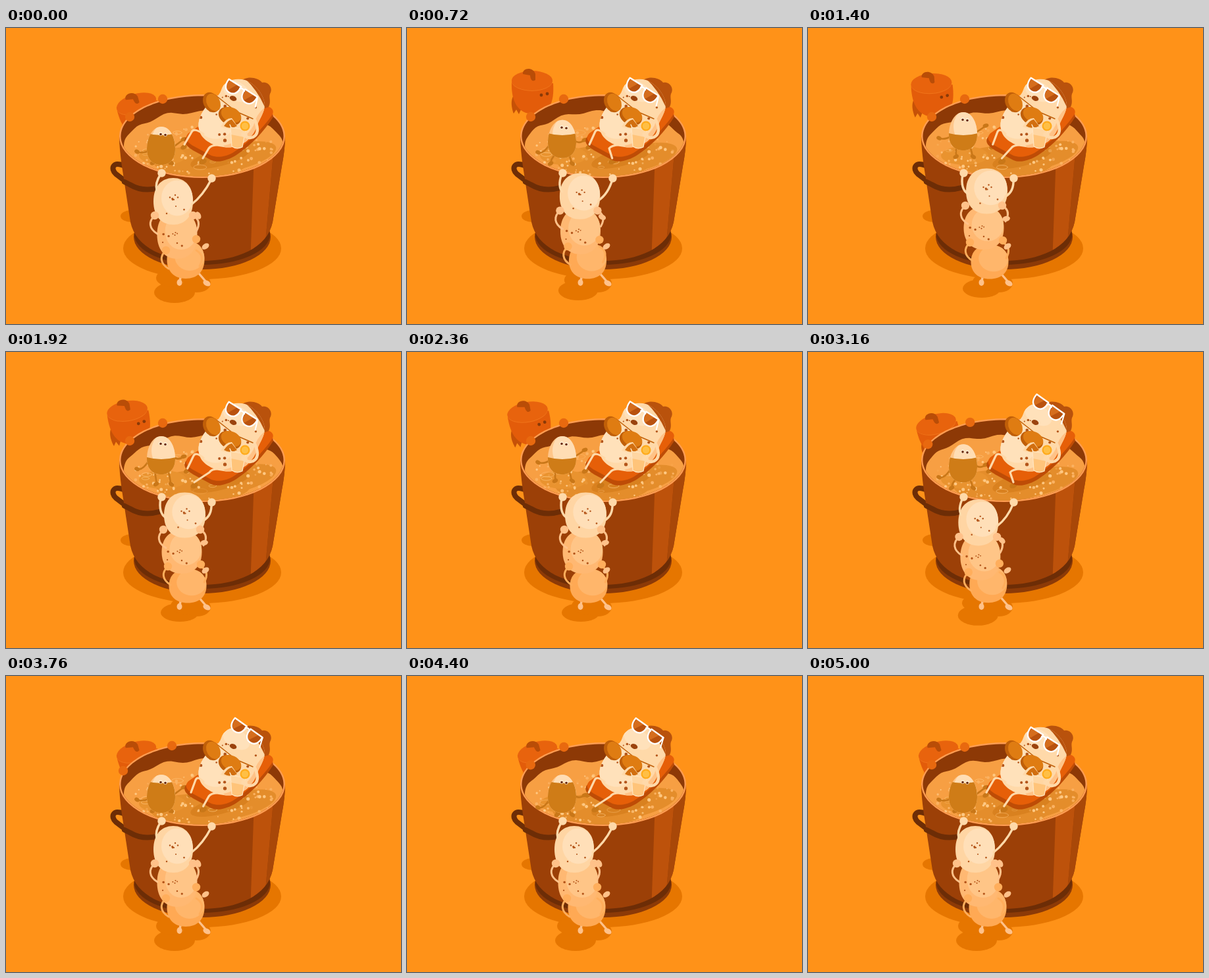
An HTML page with a canvas for the animation above (5040 ms loop, 600 by 450 pixels).

```html
<!DOCTYPE html>
<html lang="en">
<head>
<meta charset="utf-8">
<style>
html, body { margin: 0; width: 100%; height: 100%; overflow: hidden; background: #ff9218; }
canvas { display: block; }
</style>
</head>
<body>
<canvas id="stage" width="600" height="450"></canvas>
<script>
const c = document.getElementById('stage').getContext('2d');
const LOOP = 5040, TAU = Math.PI * 2;
const SKIN = '#ffd9a9', SPOT = '#b4551a', LIMB = '#c97718', SHADOW = '#e67600';

const mix = (a, b, p) => a + (b - a) * p;
function ramp(t, a, b) {
  const p = Math.min(1, Math.max(0, (t - a) / (b - a)));
  return p * p * (3 - 2 * p);
}
// Rises from a to b, holds, falls from d to e
const hold = (t, a, b, d, e) => ramp(t, a, b) - ramp(t, d, e);
const wave = (t, n, fn = Math.sin) => fn(t / LOOP * TAU * n);

let seed = 11;
const rnd = () => (seed = (seed * 16807) % 2147483647) / 2147483647;
function scatter(n, size) {
  return Array.from({ length: n }, () => {
    const a = rnd() * TAU, d = Math.sqrt(rnd());
    return { x: Math.cos(a) * d, y: Math.sin(a) * d, r: mix(0.9, size, rnd()), ph: rnd() };
  });
}
const bubbles = scatter(150, 2.6), rings = scatter(6, 1);
const specks = [scatter(5, 1.7), scatter(9, 1.8), scatter(15, 2.9)];

function ell(x, y, rx, ry, color, rot = 0) {
  c.beginPath();
  c.ellipse(x, y, rx, ry, rot, 0, TAU);
  c.fillStyle = color;
  c.fill();
}
const dot = (x, y, r, color) => ell(x, y, r, r, color);
function fill(d, color) {
  c.fillStyle = color;
  c.fill(new Path2D(d));
}
function line(d, color, w) {
  c.strokeStyle = color;
  c.lineWidth = w;
  c.stroke(new Path2D(d));
}
function clipped(path, draw) {
  c.save();
  c.clip(path);
  draw();
  c.restore();
}
function placed(x, y, rot, draw) {
  c.save();
  c.translate(x, y);
  c.rotate(rot);
  draw();
  c.restore();
}
function speckle(list, x, y, rx, ry) {
  list.forEach(s => dot(x + s.x * rx, y + s.y * ry, s.r, SPOT));
}
// Plump oval; k sets how square the shoulders are
function plump(x, y, rx, ry, k = 0.62) {
  const p = new Path2D(), h = rx * k, v = ry * k;
  p.moveTo(x, y - ry);
  p.bezierCurveTo(x + h, y - ry, x + rx, y - v, x + rx, y);
  p.bezierCurveTo(x + rx, y + v, x + h, y + ry, x, y + ry);
  p.bezierCurveTo(x - h, y + ry, x - rx, y + v, x - rx, y);
  p.bezierCurveTo(x - rx, y - v, x - h, y - ry, x, y - ry);
  return p;
}

const body = new Path2D('M172 165C172 178 174 195 176 210L189 295C197 334 242 354 297 354C352 354 397 334 405 295L419 210C422 195 424 178 424 165Z');
const inside = plump(298, 164.5, 123.5, 61, 0.552);

function shadows(p) {
  ell(298, 335, 120, 47, SHADOW);
  ell(190, 286, 16, 9, SHADOW);
  ell(mix(256, 264, p), mix(402, 396, p), mix(31, 29, p), mix(16, 14, p), SHADOW);
  ell(mix(250, 272, p), mix(380, 386, p), 22, 13, SHADOW);
  ell(290, 388, 21, 14, SHADOW);
}

function pumpkin(t) {
  const up = hold(t, 540, 710, 2860, 3300), drift = ramp(t, 760, 2300);
  const x = mix(198, mix(190, 183, drift), up), y = mix(115, mix(80, 91, drift), up);
  placed(x, y, mix(-0.28, -0.18 * drift, up), () => {
    fill('M-26 20C-34 28 -31 42 -28 50L-24 44L-20 51L-16 42L-16 24Z', '#c65107');
    fill('M-31 2C-32 32 -22 50 2 51C26 52 34 34 32 4Z', '#e35c0a');
    ell(0, 1, 31, 15, '#f0741a');
    ell(0, 0, 31, 15, '#e8630d');
    fill('M-14 -10C-15 -20 2 -21 5 -10L5 -1C1 2 -2 0 -3 -8Z', '#b94d07');
    dot(14, 22, 2.4, '#8a3a08');
    dot(23, 20, 2.4, '#8a3a08');
  });
}

function pot() {
  ell(298, 317.5, 104, 49.5, '#8c3a07');
  ell(298, 314, 103, 46, '#6d2d06');
  line('M178 209C163 202 158 214 167 222L188 238Q208 250 232 243', '#6d2d06', 8);
  clipped(body, () => {
    c.fillStyle = '#9c4007';
    c.fillRect(160, 150, 280, 210);
    fill('M377 190L371 360L391 360L407 180Z', '#bd520b');
    fill('M407 180L391 360L430 360L430 160Z', '#a94808');
  });
  line('M180 234L188 238Q208 250 232 243', '#6d2d06', 8);
  ell(298, 164.5, 126, 63.5, '#ff9d52');
  c.fillStyle = '#8d3906';
  c.fill(inside);
}

function broth(t) {
  const soup = new Path2D();
  for (let i = 0; i <= 120; i++) {
    const a = i / 120 * TAU, back = Math.max(0, -Math.sin(a));
    const lap = back * (2.6 * Math.sin(a * 13 + wave(t, 2)) + 1.2 * Math.sin(a * 7 - wave(t, 1)));
    soup.lineTo(300 + Math.cos(a) * 121, 179 + Math.sin(a) * 52 + lap);
  }
  clipped(inside, () => clipped(soup, () => {
    c.fillStyle = '#f79f43';
    c.fillRect(160, 90, 280, 150);
    ell(296 + 5 * wave(t, 1), 203, 72, 24, '#e48d2b');
    ell(352, 196 + 2 * wave(t, 2), 60, 19, '#e48d2b', -0.25);
    ell(238, 194, 36, 14, '#e9932f');
    ell(325, 197, 46, 13, '#d9811f', -0.25);
    rings.forEach(r => {
      const p = (t / LOOP * 3 + r.ph) % 1;
      c.globalAlpha = Math.sin(p * Math.PI) * 0.65;
      c.beginPath();
      c.ellipse(295 + r.x * 95, 182 + r.y * 30, 3 + p * 9, 1 + p * 3.5, 0, 0, TAU);
      c.strokeStyle = '#ffc880';
      c.lineWidth = 1;
      c.stroke();
    });
    bubbles.forEach(b => {
      const p = (t / LOOP * (2 + Math.floor(b.ph * 3)) + b.ph * 7) % 1;
      c.globalAlpha = Math.min(1, 2.2 * Math.sin(p * Math.PI));
      dot(304 + b.x * 112, 187 + b.y * 38 - p * 3, b.r, b.ph > 0.4 ? '#ffc882' : '#fbb262');
    });
    c.globalAlpha = 1;
  }));
}

function egg(t) {
  const rise = hold(t, 100, 1400, 2820, 3450), beat = -wave(t, 4, Math.cos);
  const y = mix(150, 128, rise), cy = y + 30;
  const hand = y + 44 + 6 * beat, reach = y + 25 + 6 * beat;
  const foot = mix(208, 198, rise) + 3 * beat, kick = 5 * wave(t, 2);
  line(`M226 ${y + 52}Q${222 - kick} ${y + 60} ${224 - kick} ${foot}M246 ${y + 52}Q249 ${y + 60} 250 ${foot}`, LIMB, 2.6);
  ell(223 - kick, foot, 4.5, 3, LIMB, -0.5);
  ell(251, foot, 4.5, 3, LIMB, 0.6);
  line(`M217 ${y + 37}Q207 ${hand + 3} 199 ${hand}M254 ${y + 31}Q261 ${reach + 7} 270 ${reach}`, LIMB, 2.6);
  ell(199, hand, 4, 3, LIMB, 0.5);
  ell(270, reach, 4.5, 3, LIMB, -0.3);
  const shell = new Path2D(
    `M236 ${y}C249 ${y} 257 ${cy - 14} 257 ${cy + 4}C257 ${cy + 20} 248 ${y + 58} 236 ${y + 58}C223 ${y + 58} 214 ${cy + 20} 214 ${cy + 4}C214 ${cy - 14} 223 ${y} 236 ${y}Z`);
  clipped(shell, () => {
    c.fillStyle = '#ffc68a';
    c.fillRect(210, 120, 52, 100);
    ell(241, y + 22, 20, 26, '#ffddb4');
    fill('M208 158Q236 168 264 158L264 225L208 225Z', '#cf7c17');
  });
  [[235, 11], [242, 12]].forEach(([x, dy]) => {
    dot(x, y + dy, 2.8, '#fff0da');
    dot(x, y + dy + 0.5, 1.8, '#6c2c08');
  });
}

function lens(x) {
  const d = `M${x - 11} -8L${x + 11} -8C${x + 12} 4 ${x + 7} 9 ${x} 9C${x - 7} 9 ${x - 12} 4 ${x - 11} -8Z`;
  fill(d, '#b9520f');
  fill(`M${x - 9} -7L${x + 4} -7L${x - 4} 8Q${x - 10} 5 ${x - 9} -7Z`, '#d56d1d');
  line(d, '#fff', 2.4);
}

function shades(t) {
  const lift = hold(t, 2250, 3300, 4350, 4900), nod = hold(t, 200, 700, 4350, 4900) * (1 - lift);
  placed(mix(356, 364, lift), mix(98, 85, lift) - 2 * nod, mix(0.56, 0.62, lift), () => {
    lens(-14.5);
    lens(14.5);
    line('M-4 -5Q0 -8 4 -5', '#fff', 2.4);
    line('M26 -8L31 7', '#fff', 2);
  });
}

function chair() {
  fill('M275 164C266 173 275 180 284 186L312 201C323 206 339 200 350 193C373 178 392 157 406 135L404 126Z', '#be4c06');
  fill('M277 160C270 168 275 173 284 179L312 194C323 198 337 195 347 188C370 173 390 153 405 131C408 124 402 119 394 119L350 122L290 151Z', '#e65f08');
}

function torso() {
  fill('M355 83C363 72 382 74 389 83C400 81 406 93 401 100C399 106 403 112 399 120L388 124Z', '#b9520c');
  const skin = new Path2D('M327 94C331 80 348 75 363 79C377 84 389 98 392 111C396 124 386 136 382 147C376 165 362 179 344 181C325 184 301 174 295 160C289 146 294 133 303 121C312 109 324 105 327 94Z');
  clipped(skin, () => {
    c.fillStyle = SKIN;
    c.fillRect(285, 70, 115, 120);
    ell(320, 140, 30, 28, '#ffe1ba', -0.5);
    ell(350, 96, 22, 14, '#ffe1ba', 0.5);
    fill('M362 76Q382 94 394 122L402 90Z', '#b9520c');
    fill('M394 120Q380 131 376 148Q364 171 330 179L345 190L390 165Z', '#ffc286');
    speckle(specks[2], 340, 130, 48, 46);
  });
  // swimwear
  line('M318 102L342 121M352 128L375 138', '#c05f08', 1.5);
  ell(312, 113, 12, 16, '#c05f08', -0.5);
  ell(315, 113, 10, 14, '#df7c12', -0.5);
  ell(340, 134, 18, 13, '#c05f08', 0.45);
  ell(342, 132, 16, 11, '#df7c12', 0.45);
  fill('M326 150Q333 137 343 137L352 150Q340 156 326 150Z', SKIN);
  fill('M331 149Q337 140 343 139L351 149Q341 155 331 149Z', '#d26f10');
}

function bather(t) {
  const sway = -wave(t, 2, Math.cos), kick = wave(t, 2);
  const ax = 285 + 3 * sway, fx = 276 + 5 * sway, ex = 299 + 13 * kick;
  ell(fx - 1, 181, 5, 3.5, LIMB, -0.5);
  ell(ex, 203, 6, 4, LIMB, -0.4);
  chair();
  torso();
  line(`M300 161Q${ax + 3} 151 ${ax} 158L${fx} 177`, SKIN, 3.2);
  line(`M326 178Q312 177 ${308 - kick} 183L${ex} 198`, SKIN, 3.2);
  ell(345, 107, 5.5, 3.6, '#9b430d', 0.35);
  shades(t);
  // drink and arm
  line('M345 158L340 147', '#fff0d5', 1.4);
  const cup = 'M341 151L364 155L359 181Q350 185 343 180Z';
  fill(cup, '#ffd6a2');
  fill('M342 162L362 166L359 181Q350 185 343 180Z', '#ffc47a');
  line(cup, '#ffe5c2', 1.2);
  dot(363, 149, 7.5, '#ffab1c');
  dot(363, 149, 5.2, '#ffbf45');
  line('M378 140Q387 160 375 166Q367 169 361 162', SKIN, 4.5);
  ell(362, 162, 5, 4, SKIN, 0.4);
}

function grip(t) {
  const g = hold(t, 2860, 3400, 3950, 4450);
  dot(mix(238, 252, g), mix(108, 106, g), 7.2, '#e8690f');
  dot(mix(188, 178, g), mix(135, 144, g), 7.2, '#e8690f');
}

function potato(x, y, rx, ry, base, light) {
  clipped(plump(x, y, rx, ry), () => {
    c.fillStyle = base;
    c.fillRect(x - 40, y - 40, 80, 80);
    ell(x + 6, y - 5, rx * 0.8, ry * 0.76, light);
  });
}

function carry(x, y, far, hand, color) {
  line(`M${x} ${y}C${x - 10} ${y + 9} ${x - 9} ${y + 20} ${x + 4} ${y + 28}`, color, 3);
  line(`M${far} ${y}Q${far + 14} ${y + 8} ${far + 5} ${y + 24}`, color, 3);
  dot(x, y, 6.2, color);
  dot(far, hand, 6.2, color);
}

function stack(p) {
  const m = (a, b) => mix(a, b, p);
  const tx = m(254, 271.5), ty = m(263.5, 248), mx = m(260, 267), my = m(314, 304);
  const peach = '#ffc189', warm = '#ffae5c';
  line('M266 372L264 386M292 372L304 386', peach, 3.4);
  ell(263.5, 387, 4, 5, peach);
  ell(305, 388, 6, 4, peach, 0.5);
  potato(m(273, 276), m(352, 355.5), 28.5, m(29, 26), '#ffa954', '#ffb66b');
  potato(mx, my, 30.5, m(37, 33), '#ffb872', '#ffc587');
  potato(tx, ty, m(30, 31.5), m(35.5, 34.5), '#ffd5a3', '#ffdfb8');
  line(`M${m(229, 243)} ${m(246, 252)}Q${m(226, 231)} ${m(236, 245)} 235 222`, SKIN, 3.4);
  line(`M${m(282, 300)} ${m(268, 256)}Q${m(299, 313)} ${m(255, 249)} 312 230`, SKIN, 3.4);
  dot(236.5, 220.5, 6.2, SKIN);
  dot(312.5, 228.5, 6.2, SKIN);
  carry(m(226, 239), m(285, 270), m(284, 295), m(285, 270), peach);
  ell(m(292, 301), m(285, 290), 6, 4, peach, m(1.1, -0.2));
  carry(m(243, 246), m(338, 326), m(289, 296), m(321, 323), warm);
  ell(303, 332, 6, 4, peach, -0.6);
  for (let i = 0; i < 4; i++) dot(tx - 5 + i * 4, ty - 6 + 4 * wave(i, LOOP / 3), 1.2, SPOT);
  speckle(specks[0], tx, ty + 8, 22, 18);
  speckle(specks[1], mx, my + 8, 26, 15);
}

function draw(t) {
  const climb = hold(t, 300, 1150, 2700, 3400);
  c.fillStyle = '#ff9218';
  c.fillRect(0, 0, 600, 450);
  c.lineCap = c.lineJoin = 'round';
  shadows(climb);
  pumpkin(t);
  pot();
  broth(t);
  egg(t);
  bather(t);
  grip(t);
  stack(climb);
}

const start = performance.now();
function tick() {
  draw((performance.now() - start) % LOOP);
  requestAnimationFrame(tick);
}
tick();
</script>
</body>
</html>
```
